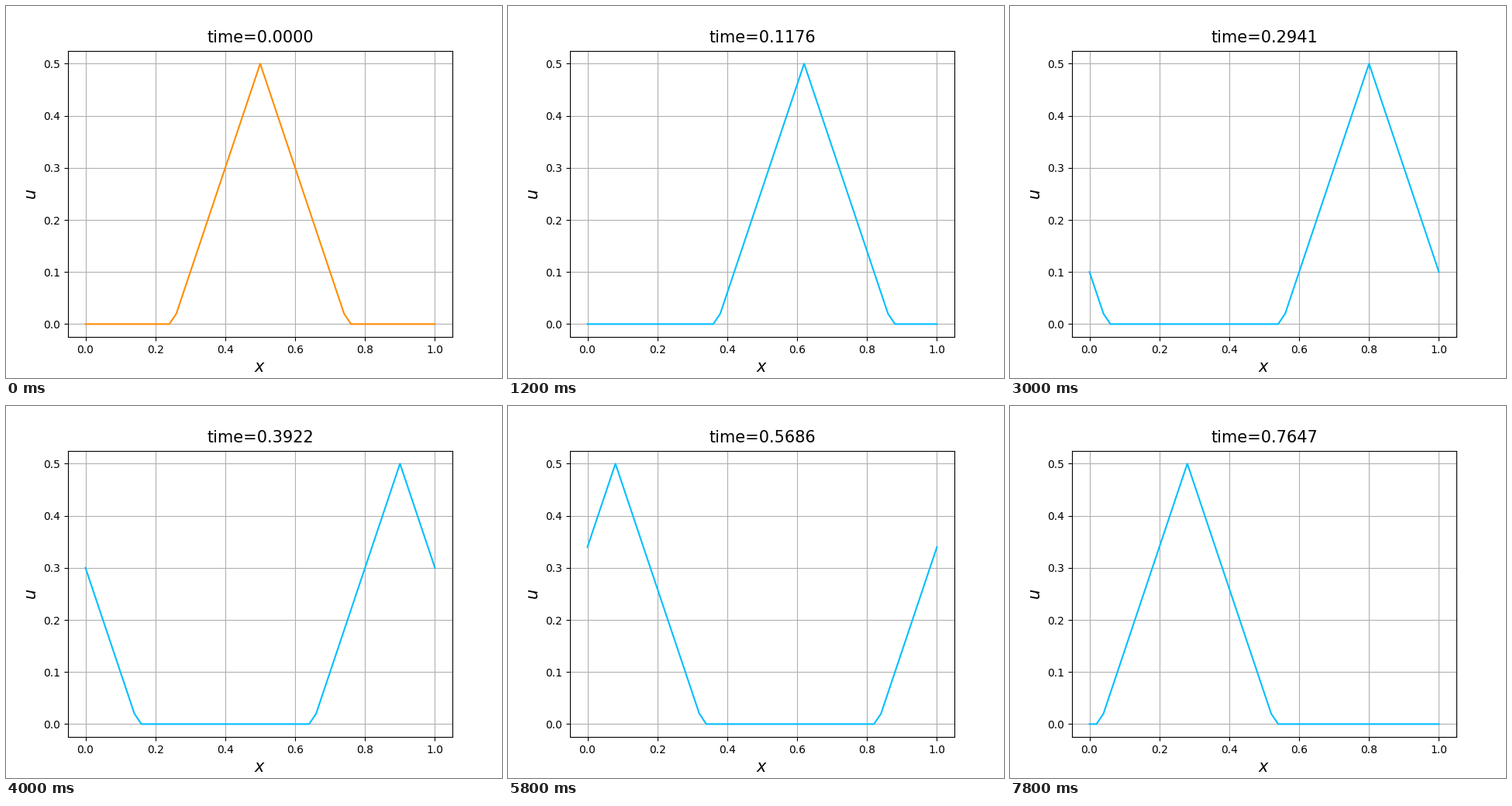
Recreate the animation shown at these times as a matplotlib script. Size 640 by 480 pixels, loop 8000 ms.

```python
import numpy as np
import matplotlib.pyplot as plt
from matplotlib.animation import FuncAnimation

CELLS = 50       # grid intervals on [0, 1]
FRAMES = 40
INTERVAL = 200   # ms
DT = 1 / 51

x = np.linspace(0, 1, CELLS + 1)
cells = np.arange(CELLS + 1)


def wave(step):
    """Triangular pulse moved right by whole cells on a periodic grid."""
    pos = (cells - step) % CELLS / CELLS
    return np.maximum(0.5 - 2 * np.abs(pos - 0.5), 0)


fig, ax = plt.subplots(figsize=(6.4, 4.8), dpi=100)
ax.set_xlim(-0.05, 1.05)
ax.set_ylim(-0.025, 0.525)
ax.set_xlabel("$x$", fontsize=15)
ax.set_ylabel("$u$", fontsize=15)
ax.grid(True)

line, = ax.plot(x, wave(0), color="darkorange", linewidth=1.5)
clock = ax.text(0.5, 1.03, "", fontsize=15, ha="center",
                transform=ax.transAxes)


def update(step):
    line.set_ydata(wave(step))
    line.set_color("deepskyblue" if step else "darkorange")
    clock.set_text(f"time={step * DT:.4f}")
    return line, clock


anim = FuncAnimation(fig, update, frames=FRAMES, interval=INTERVAL,
                     init_func=lambda: update(0), repeat=True,
                     repeat_delay=0)
plt.show()
```
